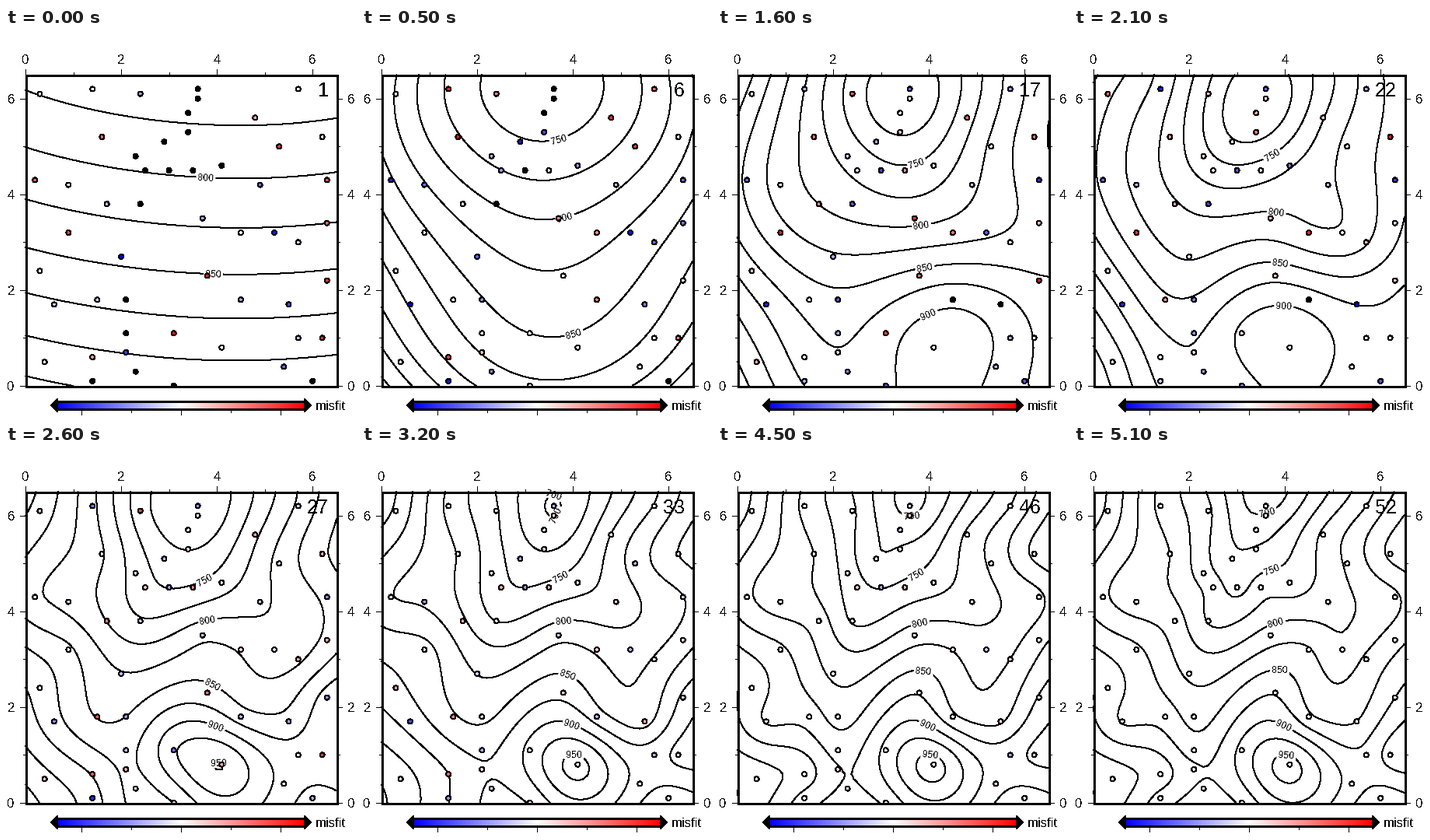
A matplotlib script for the animation above (5200 ms loop, 450 px wide and 500 px high).

```python
import numpy as np
import matplotlib as mpl
import matplotlib.pyplot as plt
from matplotlib.animation import FuncAnimation
from matplotlib.patches import Polygon, Rectangle
from matplotlib.transforms import Affine2D

mpl.rcParams["font.family"] = "Liberation Sans"
mpl.rcParams["text.antialiased"] = False

W, H, DPI = 450, 500, 100
PX = 72 / DPI                      # one pixel in points
X0, Y0, SIDE, SPAN = 25, 40, 400, 6.5
SCALE = SIDE / SPAN
DIGIT = 0.556                      # digit advance in em

# Survey points: position and height
xs = np.array([
    0.3, 1.4, 2.4, 3.6, 5.7, 1.6, 2.9, 3.4, 3.4, 4.8, 5.3, 6.2, 0.2,
    0.9, 2.3, 2.5, 3.0, 3.5, 4.1, 4.9, 6.3, 0.9, 1.7, 2.4, 3.7, 4.5,
    5.2, 6.3, 0.3, 2.0, 3.8, 6.3, 0.6, 1.5, 2.1, 2.1, 3.1, 4.5, 5.5,
    5.7, 6.2, 0.4, 1.4, 1.4, 2.1, 2.3, 3.1, 4.1, 5.4, 6.0, 5.7, 3.6])
ys = np.array([
    6.1, 6.2, 6.1, 6.2, 6.2, 5.2, 5.1, 5.3, 5.7, 5.6, 5.0, 5.2, 4.3,
    4.2, 4.8, 4.5, 4.5, 4.5, 4.6, 4.2, 4.3, 3.2, 3.8, 3.8, 3.5, 3.2,
    3.2, 3.4, 2.4, 2.7, 2.3, 2.2, 1.7, 1.8, 1.8, 1.1, 1.1, 1.8, 1.7,
    1.0, 1.0, 0.5, 0.6, 0.1, 0.7, 0.3, 0.0, 0.8, 0.4, 0.1, 3.0, 6.0])
zs = np.array([
    870, 793, 755, 690, 800, 800, 730, 728, 710, 780, 804, 855, 830,
    813, 762, 765, 740, 765, 760, 790, 820, 855, 812, 773, 812, 827,
    805, 840, 890, 820, 873, 875, 873, 865, 841, 862, 908, 855, 850,
    882, 910, 940, 915, 890, 880, 870, 880, 960, 890, 860, 830, 705])
N = len(zs)


def green(x, y):
    """Biharmonic Green's function from every (x, y) to every survey point."""
    r = np.hypot(x[:, None] - xs, y[:, None] - ys)
    safe = np.where(r > 0, r, 1)
    return np.where(r > 0, r**2 * (np.log(safe) - 1), 0)


def plane(x, y):
    return np.column_stack([np.ones_like(x), x, y])


# Spline on the detrended heights, solved in its eigenvector basis
trend = np.linalg.lstsq(plane(xs, ys), zs, rcond=None)[0]
lam, vec = np.linalg.eigh(green(xs, ys))
order = np.argsort(-np.abs(lam))
lam, vec = lam[order], vec[:, order]
amp = vec.T @ (zs - plane(xs, ys) @ trend) / lam

nodes = np.linspace(0, SPAN, 66)
gx, gy = np.meshgrid(nodes, nodes)
grid_base = plane(gx.ravel(), gy.ravel()) @ trend
grid_modes = green(gx.ravel(), gy.ravel()) @ vec
data_base = plane(xs, ys) @ trend
data_modes = green(xs, ys) @ vec


def to_px(x, y):
    return X0 + SCALE * x, Y0 + SCALE * y


fig = plt.figure(figsize=(W / DPI, H / DPI), dpi=DPI, facecolor="white")
ax = fig.add_axes([0, 0, 1, 1])
ax.axis("off")
polar = mpl.colormaps["bwr"].with_extremes(under="black", over="white")


def line(x, y, width=1, z=4):
    ax.plot(x, y, color="black", lw=width * PX, antialiased=False,
            solid_capstyle="butt", zorder=z)


def text(x, y, s, size, **kw):
    return ax.text(x, y, s, fontsize=size, va="baseline", **kw)


def draw_map_frame():
    ax.add_patch(Rectangle((X0 + .5, Y0 - .5), SIDE, SIDE, fill=False, ec="black",
                           lw=3 * PX, joinstyle="miter", antialiased=False, zorder=4))
    right, top = X0 + SIDE, Y0 + SIDE
    for v in range(7):
        px, py = to_px(v, v)
        size = 3.5 if v % 2 else 7
        line([px, px], [top, top + size])
        line([X0 - size, X0], [py, py])
        line([right, right + size], [py, py])
        if v % 2 == 0:
            text(px, top + 14, str(v), 12, ha="center")
            text(X0 - 23.3, py - 6, str(v), 12, ha="left")
            text(right + 14, py - 6, str(v), 12, ha="left")


def draw_colorbar():
    left, right, low, high = 65, 385, 10, 20
    ramp = np.linspace(-25, 25, right - left)[None, :]
    ax.imshow(ramp, extent=(left, right, low, high), cmap=polar, vmin=-25, vmax=25,
              aspect="auto", interpolation="nearest", zorder=2)
    mid = (low + high) / 2
    for x, tip, fill in ((left, left - 5, "black"), (right, right + 5, "white")):
        ax.add_patch(Polygon([(x, low), (tip, mid), (x, high)], fc=fill, ec="black",
                             lw=3 * PX, joinstyle="miter", antialiased=False, zorder=3))
    for y in (low, high):
        line([left, right], [y, y], 3)
    for v in range(-20, 21, 10):
        x = 225 + 6.4 * v
        line([x, x], [low, low - (3.5 if v % 20 else 7)])
    text(398, 9, "misfit", 12, ha="left")


draw_map_frame()
draw_colorbar()

dots = ax.scatter(*to_px(xs, ys), c=np.zeros(N), s=(6 * PX)**2, cmap=polar,
                  vmin=-25, vmax=25, edgecolors="black", linewidths=PX,
                  antialiased=False, zorder=5)
dots.set_clip_path(Rectangle((X0, Y0), SIDE, SIDE, transform=ax.transData))
counter = text(0, 412, "", 18, ha="left", zorder=6)
ax.set(xlim=(0, W), ylim=(0, H))

# Labels sit where contours cross this line
P = np.array(to_px(3.6, 6.5))
D = np.array(to_px(4.05, 0.75)) - P
LEVELS = np.arange(600, 1101, 25)
shown = []


def crossings(seg):
    """Yield point and upright angle wherever a contour meets the label line."""
    rel = seg - P
    side = D[0] * rel[:, 1] - D[1] * rel[:, 0]
    for k in np.flatnonzero(side[:-1] * side[1:] < 0):
        f = side[k] / (side[k] - side[k + 1])
        pt = seg[k] + f * (seg[k + 1] - seg[k])
        if 0 <= (pt - P) @ D / (D @ D) <= 1:
            a, b = seg[max(k - 3, 0)], seg[min(k + 4, len(seg) - 1)]
            angle = np.degrees(np.arctan2(*(b - a)[::-1]))
            yield pt, (angle + 90) % 180 - 90


def add_label(pt, angle, level):
    w, h = 25, 13
    turn = Affine2D().rotate_deg(angle).translate(*pt)
    box = Rectangle((-w / 2, -h / 2), w, h, fc="white", ec="none", zorder=2,
                    transform=turn + ax.transData)
    shown.append(ax.add_patch(box))
    x, y = turn.transform((0, -4.5))
    shown.append(text(x, y, f"{level:.0f}", 9, ha="center", rotation=angle,
                      rotation_mode="anchor", zorder=3))


def update(i):
    n = i + 1
    while shown:
        shown.pop().remove()
    grid = (grid_base + grid_modes[:, :n] @ amp[:n]).reshape(gx.shape)
    cs = ax.contour(*to_px(gx, gy), grid, levels=LEVELS, colors="black",
                    linewidths=PX, antialiased=False, zorder=1)
    shown.append(cs)
    for level, segs in zip(cs.levels, cs.allsegs):
        if level % 50 == 0:
            for seg in segs:
                for pt, angle in crossings(seg):
                    add_label(pt, angle, level)
    dots.set_array(zs - data_base - data_modes[:, :n] @ amp[:n])
    counter.set_text(str(n))
    counter.set_x(415 - 25 * DIGIT * len(str(n)))
    ax.set(xlim=(0, W), ylim=(0, H))
    return [dots, counter]


anim = FuncAnimation(fig, update, frames=N, interval=100, repeat=True,
                     repeat_delay=0, init_func=lambda: [], blit=False)
plt.show()
```
